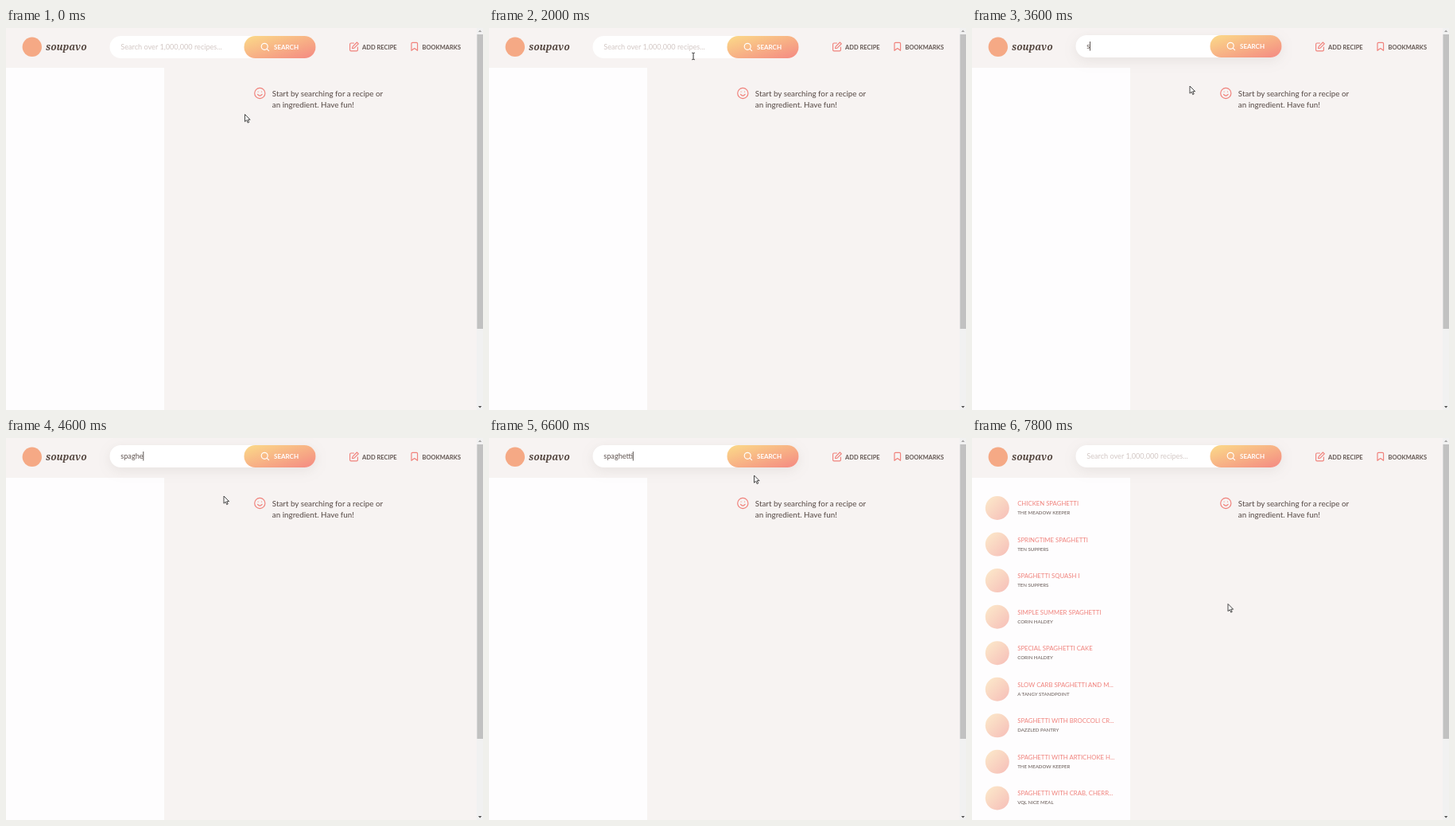
Write an HTML page that moves like this. It is 600 px wide and 480 px high and loops after 8000 ms.

```html
<!DOCTYPE html>
<html lang="en">
<head>
<meta charset="utf-8">
<title>Recipe search</title>
<style>
  html, body { margin: 0; width: 100%; height: 100%; overflow: hidden; background: #f7f3f2; }
  svg { display: block; width: 600px; height: 480px; }
  text { font-family: Lato, "Open Sans", sans-serif; fill: #615551; white-space: pre; }
  .brand { font: italic 700 12px "Noto Serif", serif; fill: #54463f; }
  .nav { font-size: 7.5px; font-weight: 700; }
  .message { font-size: 9.8px; font-weight: 500; }
  .field { font-size: 9.15px; }
  #placeholder { fill: #d3c8c5; }
  .button { font-size: 8px; font-weight: 700; fill: #fff; }
  .title { font-size: 7.75px; fill: #f0827c; }
  .author { font-size: 6.1px; font-weight: 500; fill: #6f635f; }
  .icon { fill: none; stroke: #f0817b; stroke-width: 1.15; stroke-linecap: round; stroke-linejoin: round; }
</style>
</head>
<body>
<svg viewBox="0 0 600 480">
  <defs>
    <linearGradient id="warm" x1="0" y1="0" x2="1" y2="1">
      <stop stop-color="#fbdb89"/><stop offset="1" stop-color="#f48982"/>
    </linearGradient>
    <linearGradient id="pale" x1="0" y1="0" x2="1" y2="1">
      <stop stop-color="#fcebcb"/><stop offset="1" stop-color="#f6bdb8"/>
    </linearGradient>
  </defs>

  <rect width="600" height="480" fill="#f7f3f2"/>
  <rect y="50" width="199" height="430" fill="#fefdfe"/>

  <circle cx="32.8" cy="23.8" r="12.2" fill="#f5a985"/>
  <text class="brand" x="50" y="27.5">soupavo</text>

  <g id="search">
    <rect id="pill" x="130.5" y="10" width="259" height="28" rx="14" fill="#fff"/>
    <text id="placeholder" class="field" x="144.3" y="26.8">Search over 1,000,000 recipes...</text>
    <text id="query" class="field" x="144.3" y="26.8"></text>
    <rect id="caret" y="18" width=".9" height="11.5" fill="#4c4340"/>
    <g id="button">
      <rect x="299.5" y="10" width="90" height="28" rx="14" fill="url(#warm)"/>
      <g class="icon" style="stroke:#fff"><circle cx="325.2" cy="23.3" r="4"/><path d="M328.2 26.3l2.4 2.4"/></g>
      <text class="button" x="337" y="26.9">SEARCH</text>
    </g>
  </g>

  <g class="icon">
    <path d="M437.5 19H434a1.4 1.4 0 0 0-1.4 1.4v7a1.4 1.4 0 0 0 1.4 1.4h7a1.4 1.4 0 0 0 1.4-1.4V24M441.4 18l1.9 1.9-5.3 5.3-2.4.5.5-2.4z"/>
    <path d="M510 28.3V19.5a1.2 1.2 0 0 1 1.2-1.2h5.2a1.2 1.2 0 0 1 1.2 1.2v8.8l-3.8-2.8z"/>
    <circle cx="319.3" cy="82" r="6.6"/>
    <path d="M316.5 83.4q2.8 3.4 5.6 0M317.1 80v.1M321.5 80v.1"/>
  </g>
  <text class="nav" x="448" y="26.8">ADD RECIPE</text>
  <text class="nav" x="523.5" y="26.8">BOOKMARKS</text>
  <text class="message" x="334.8" y="85.7">Start by searching for a recipe or</text>
  <text class="message" x="334.8" y="99.5">an ingredient. Have fun!</text>

  <g id="spinner" stroke="#ec8480" stroke-width="2.5"></g>
  <g id="results"></g>

  <rect x="592" width="8" height="480" fill="#f1f1f1"/>
  <rect x="592.5" y="8" width="7.5" height="370" fill="#c1c1c1"/>
  <path d="M594 5l2.2-2.6L598.400 5z" fill="#a3a3a3"/>
  <path d="M594 475l2.200 2.600L598.400 475z" fill="#505050"/>

  <g id="cursor" stroke-linejoin="round">
    <path id="arrow" d="M0 0v9.200l2.200-2 1.500 3.400 1.500-.7-1.500-3.200H6.600z" fill="#fff" stroke="#333" stroke-width=".9"/>
    <path id="beam" d="M-1.800-4.300Q0-4.300 0-3.500Q0-4.300 1.800-4.300M0-3.500V3.500M-1.800 4.300Q0 4.300 0 3.500Q0 4.300 1.800 4.300" fill="none" stroke="#333"/>
    <path id="hand" d="M-.9 1Q0-.6.9 1V5l1.200-.5 1 .7 1.200-.2.700.8.900.2V9.300L4.700 12H-.3L-3.800 7.500Q-3.600 6.100-2.300 6.700L-.9 8z" fill="#fff" stroke="#333" stroke-width=".9"/>
  </g>
</svg>
<script>
const LOOP = 8000, TICK = 200;
const FOCUS = 2300, HOVER = 6700, SUBMIT = 7200, LOADED = 7800;
const QUERY = "spaghetti", TYPE_START = 3600, TYPE_STEP = 200;

const recipes = [
  ["CHICKEN SPAGHETTI", "THE MEADOW KEEPER"],
  ["SPRINGTIME SPAGHETTI", "TEN SUPPERS"],
  ["SPAGHETTI SQUASH I", "TEN SUPPERS"],
  ["SIMPLE SUMMER SPAGHETTI", "CORIN HALDEY"],
  ["SPECIAL SPAGHETTI CAKE", "CORIN HALDEY"],
  ["SLOW CARB SPAGHETTI AND M...", "A TANGY STANDPOINT"],
  ["SPAGHETTI WITH BROCCOLI CR...", "DAZZLED PANTRY"],
  ["SPAGHETTI WITH ARTICHOKE H...", "THE MEADOW KEEPER"],
  ["SPAGHETTI WITH CRAB, CHERR...", "VQL NICE MEAL"]
];

// time, x, y of the pointer's hot spot
const path = [
  [0, 300.5, 108.5], [1200, 300.5, 108.5], [2200, 252, 27], [2600, 252, 27],
  [3600, 274, 73], [5600, 274, 73], [6600, 333.5, 47], [6800, 366, 17.5],
  [7600, 366, 17.5], [7800, 322, 208.5], [LOOP, 322, 208.5]
];

const el = id => document.getElementById(id);
const show = (id, on) => { el(id).style.display = on ? "" : "none"; };
const ramp = (t, start, length) => Math.min(1, Math.max(0, (t - start) / length));
const ease = p => p * p * (3 - 2 * p);

el("results").innerHTML = recipes.map(([title, author], i) => {
  const y = 88 + i * 45.55;
  return `<circle cx="31.8" cy="${y}" r="15" fill="url(#pale)"/>
    <text class="title" x="57.2" y="${y - 3}">${title}</text>
    <text class="author" x="57.2" y="${y + 8}">${author}</text>`;
}).join("");

el("spinner").innerHTML = Array.from({ length: 8 }, (_, i) =>
  `<path d="M7.600 0H14.200" transform="rotate(${i * 45})"/>`).join("");

function pointerAt(t) {
  const next = Math.max(1, path.findIndex(p => p[0] > t));
  const [t0, x0, y0] = path[next - 1], [t1, x1, y1] = path[next];
  const p = ease(ramp(t, t0, t1 - t0));
  return [x0 + (x1 - x0) * p, y0 + (y1 - y0) * p];
}

function drawSearch(t) {
  const lift = ease(ramp(t, FOCUS - 100, 300));
  const hover = t < LOADED ? ease(ramp(t, HOVER, 300)) : 0;
  el("search").setAttribute("transform", `translate(0 ${-lift})`);
  el("pill").style.filter = `drop-shadow(0 4px 8px rgba(97,85,81,${0.1 * lift}))`;
  el("button").setAttribute("transform",
    `translate(344.5 24) scale(${1 + 0.05 * hover}) translate(-344.5 -24)`);

  const keys = Math.floor((t - TYPE_START) / TYPE_STEP) + 1;
  const typed = t < SUBMIT ? QUERY.slice(0, Math.max(0, keys)) : "";
  el("query").textContent = typed;
  show("placeholder", !typed);

  const lastKey = TYPE_START + (Math.min(keys, QUERY.length) - 1) * TYPE_STEP;
  const blinkStart = typed ? lastKey : FOCUS;
  const lit = Math.floor((t - blinkStart) / 500) % 2 === 0;
  show("caret", t >= FOCUS && t < SUBMIT && lit);
  el("caret").setAttribute("x", 144.1 + (typed ? el("query").getComputedTextLength() : 0));
}

function drawPointer(t) {
  const [x, y] = pointerAt(t);
  const inBar = y > 9 && y < 37 && x > 130 && x < 390;
  show("beam", inBar && x < 299);
  show("hand", inBar && x >= 299);
  show("arrow", !inBar);
  el("cursor").setAttribute("transform", `translate(${x} ${y})`);
}

function draw(now) {
  const t = Math.floor(now % LOOP / TICK) * TICK;
  drawSearch(t);
  drawPointer(t);
  show("spinner", t >= SUBMIT && t < LOADED);
  el("spinner").setAttribute("transform", `translate(98.5 107) rotate(${(t - 7400) * 0.18 + 5})`);
  show("results", t >= LOADED);
}

const start = performance.now();
function frame() {
  draw(performance.now() - start);
  requestAnimationFrame(frame);
}
frame();
</script>
</body>
</html>
```
